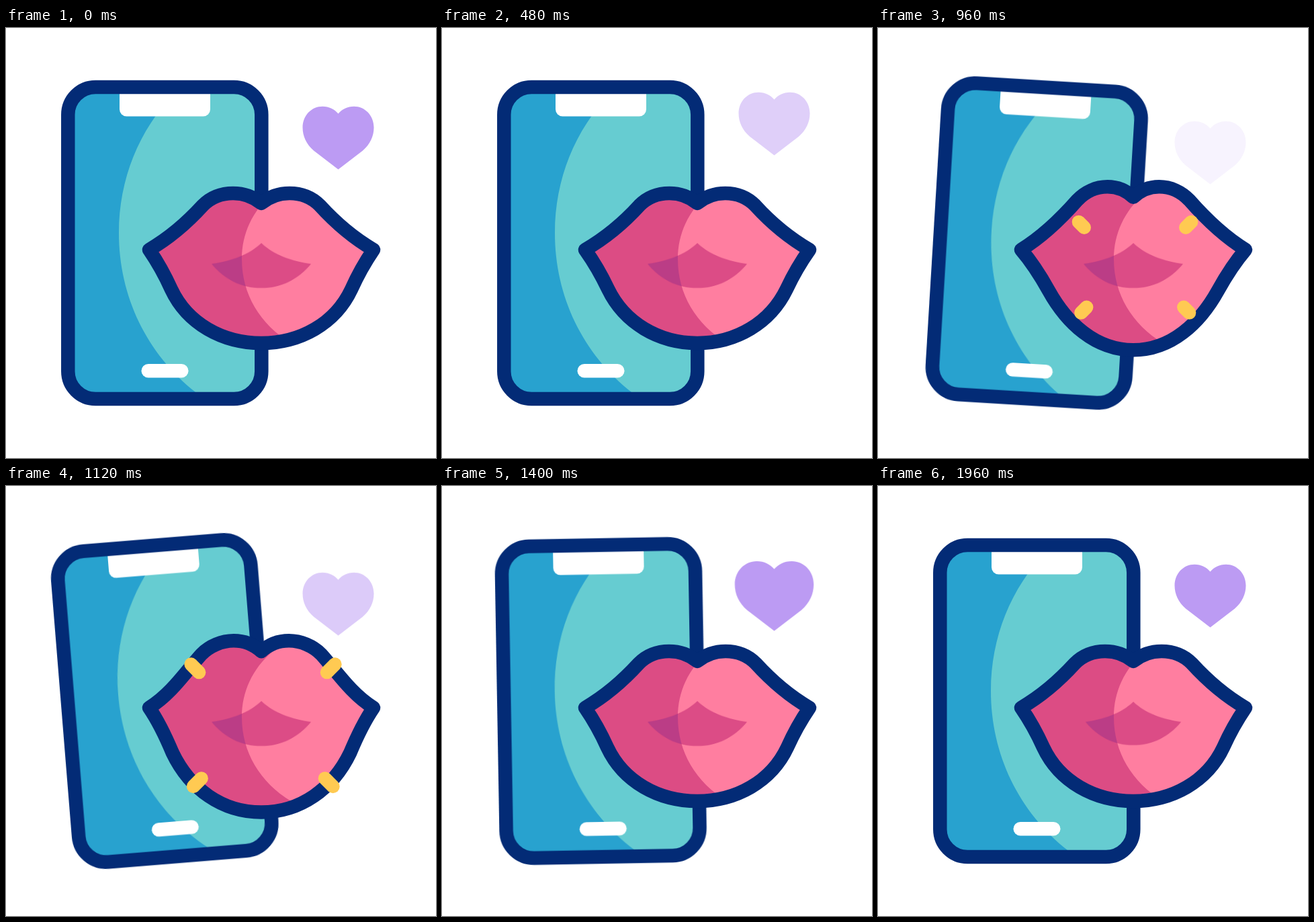
Write an HTML page that moves like this. It is 640 px wide and 640 px high and loops after 2.04 s.

```html
<!DOCTYPE html>
<html lang="en">
<head>
<meta charset="utf-8">
<title>Phone kiss</title>
<style>
html, body { margin: 0; height: 100%; overflow: hidden; background: #fff; }
svg { display: block; width: 100vw; height: 100vh; }

.phone, .rise, .beat, .lips, .mouth, .spark {
  animation: 2040ms cubic-bezier(.37, 0, .63, 1) infinite;
}
.line { fill: none; stroke: #032b76; stroke-width: 20.5; stroke-linejoin: round; }

.phone { transform-origin: 236px 320px; animation-name: tilt; }
@keyframes tilt {
  0%, 27.8% { transform: rotate(0deg); }
  40.7% { transform: rotate(7deg); }
  59.1% { transform: rotate(-6.2deg); }
  72.1%, 100% { transform: rotate(0deg); }
}

/* the heart floats off, then a new one rises from below */
.rise { animation-name: rise; }
@keyframes rise {
  0%, 16.1% { transform: translateY(0); opacity: 1; }
  30.6% { transform: translateY(-40px); opacity: 0; }
  30.61%, 40.9% { transform: translateY(25px); opacity: 0; }
  68.4%, 100% { transform: translateY(0); opacity: 1; }
}
.beat { fill: #bc9bf3; transform-origin: 494.5px 163.5px; animation-name: beat; }
@keyframes beat {
  0%, 2% { transform: scale(1); }
  9.2% { transform: scale(1.2); }
  16.1%, 56.5% { transform: scale(1); }
  79.7% { transform: scale(1.2); }
  96.4%, 100% { transform: scale(1); }
}

/* relaxed, puckered, stretched, relaxed */
.lips { animation-name: kiss; }
@keyframes kiss {
  0%, 21.2%, 64.2%, 100% {
    d: path("M380 261C368 251 354 246 338 246C320 246 304 253 293 264C272 287 244 312 213 330C226 349 237 369 246 389C270 440 322 469 380 469C438 469 490 440 514 389C523 369 534 349 547 330C516 312 488 287 467 264C456 253 440 246 422 246C406 246 392 251 380 261Z");
  }
  35.5%, 40.15% {
    d: path("M380 261C370 251 358 246 345 246C328 246 315 254 305 265C292 281 250 307 213 330C231 346 247 362 262 381C290 422 325 469 380 469C435 469 470 422 498 381C513 362 529 346 547 330C510 307 468 281 455 265C445 254 432 246 415 246C402 246 390 251 380 261Z");
  }
  52.9% {
    d: path("M380 245C368 234 355 229 339 229C321 229 303 237 291 249C270 272 246 310 213 330C226 349 238 374 248 398C274 452 322 487 380 487C438 487 486 452 512 398C522 374 534 349 547 330C514 310 490 272 469 249C457 237 439 229 421 229C405 229 392 234 380 245Z");
  }
}
.mouth { transform-origin: 380px 351px; animation-name: purse; }
@keyframes purse {
  0%, 21.2%, 64.2%, 100% { transform: scale(1, 1); }
  35.5%, 40.15% { transform: scale(.69, .72); }
  52.9% { transform: scale(1, 1.11); }
}

.spark {
  stroke: #ffca52; stroke-width: 20; stroke-linecap: round;
  visibility: hidden; animation-name: spark; animation-timing-function: linear;
}
@keyframes spark {
  0%, 44.9% { visibility: hidden; stroke-dasharray: 0 200; stroke-dashoffset: 0; }
  45% { visibility: visible; stroke-dasharray: 0 200; stroke-dashoffset: 0; }
  47.06% { visibility: visible; stroke-dasharray: 11.5 200; stroke-dashoffset: 0; }
  52.5% { visibility: visible; stroke-dasharray: 28 200; stroke-dashoffset: -12; }
  58.7% { visibility: visible; stroke-dasharray: 0 200; stroke-dashoffset: -52; }
  58.8%, 100% { visibility: hidden; stroke-dasharray: 0 200; stroke-dashoffset: -52; }
}
</style>
</head>
<body>
<svg viewBox="0 0 640 640">
  <defs>
    <path id="shade" d="M396 247C367 272 351 306 351 344C351 396 378 441 424 469V500H200V210H396Z"/>
    <path id="mouth" class="mouth" d="M306 351C335 347 361 338 380 320C399 338 425 347 454 351C435 374 410 387 380 387C350 387 325 374 306 351Z"/>
    <clipPath id="inLips"><path class="lips"/></clipPath>
    <clipPath id="inShade"><use href="#shade"/></clipPath>
  </defs>

  <g class="phone">
    <rect x="92.3" y="88" width="288" height="464" rx="41" fill="#66ccd1"/>
    <path fill="#28a2cf" d="M250 98C198 152 168 225 168 305C168 400 210 485 282 542V552H133A41 41 0 0 1 92.3 511V129A41 41 0 0 1 133 88H250Z"/>
    <path fill="#fff" d="M169 94H304V121a10.5 10.5 0 0 1-10.5 10.5H179.500a10.5 10.5 0 0 1-10.500-10.500Z"/>
    <rect x="201.500" y="500" width="70" height="20.600" rx="10.300" fill="#fff"/>
    <rect class="line" x="92.3" y="88" width="288" height="464" rx="41"/>
  </g>

  <g class="rise">
    <path class="beat" d="M494.500 210.500L458 182.500C447 173 441.500 161 441.500 148C441.500 130 455 116.800 471 116.800C481 116.800 489 121 494.500 127.500C500 121 508 116.800 518 116.800C534 116.800 547.500 130 547.500 148C547.500 161 542 173 531 182.500Z"/>
  </g>

  <path class="lips" fill="#ff7ea0"/>
  <g clip-path="url(#inLips)"><use href="#shade" fill="#dc4c84"/></g>
  <use href="#mouth" fill="#dc4c86"/>
  <g clip-path="url(#inShade)"><use href="#mouth" fill="#bb3d86"/></g>
  <path class="lips line"/>

  <path class="spark" d="M307 297l-60-60"/>
  <path class="spark" d="M458 297l60-60"/>
  <path class="spark" d="M310.500 415.500l-60 60"/>
  <path class="spark" d="M455 415.500l60 60"/>
</svg>
</body>
</html>
```
